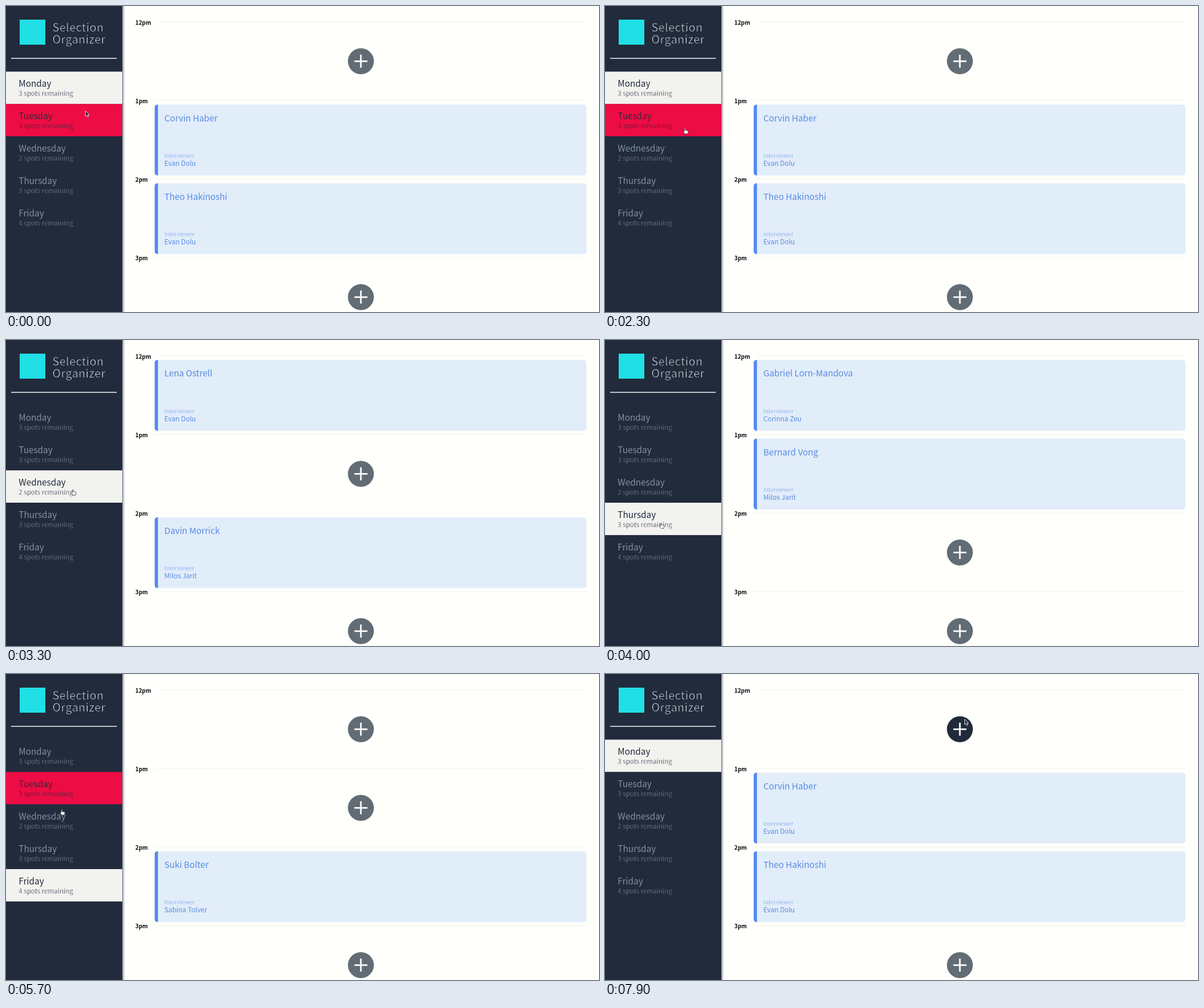
An HTML page for the animation above (8 s loop, 1041 by 538 pixels).

```html
<!DOCTYPE html>
<html lang="en">
<head>
<meta charset="utf-8">
<title>Weekly planner</title>
<style>
  html, body { margin: 0; width: 100%; height: 100%; overflow: hidden; background: #fffffb; }
  svg { display: block; --bg: #212b3c; }
  text { font-family: "Noto Sans CJK JP", "Noto Sans CJK SC", "Noto Sans CJK KR", "Noto Sans CJK", "Open Sans", sans-serif; }
  /* a background-coloured edge slims the regular weight to a light one */
  .thin { stroke: var(--bg); stroke-width: .35px; }
  .title { font-size: 19.7px; letter-spacing: .5px; fill: #e2e5e8; stroke-width: .7px; }
  .day rect { fill: var(--bg); }
  .day text { fill: #8290a5; }
  .day .name { font-size: 15.3px; }
  .day .spots { font-size: 11.55px; }
  .day.hot { --bg: #ee0c44; }
  .day.hot text { fill: #3c2438; }
  .day.on { --bg: #f2f2ef; }
  .day.on text { fill: #222a3b; }
  .hour { font-size: 10.03px; font-weight: 700; fill: #0b0d12; }
  .card { --bg: #e2edfa; }
  .card .face { fill: var(--bg); }
  .card text { fill: #578be1; }
  .guest { font-size: 15.2px; }
  .label { font-size: 9.95px; }
  .host { font-size: 11.86px; }
  .add circle { fill: #626c75; }
  .add path { stroke: #fff; stroke-width: 2.8; }
  .add.hot circle { fill: #212a3b; }
</style>
</head>
<body>
<svg width="1041" height="538" viewBox="0 0 1041 538">
  <defs>
    <linearGradient id="shade">
      <stop offset="0" stop-color="#2b3d5c" stop-opacity=".5"/>
      <stop offset="1" stop-color="#2b3d5c" stop-opacity="0"/>
    </linearGradient>
    <clipPath id="cardClip">
      <rect x="261" y="35" width="758" height="124.7" rx="5"/>
    </clipPath>
  </defs>
  <rect width="1041" height="538" fill="#fffffb"/>
  <rect x="204" width="5" height="538" fill="url(#shade)"/>
  <rect width="204.3" height="538" fill="#212b3c"/>
  <rect x="24" y="24" width="45" height="44" fill="#20dfe5"/>
  <text class="thin title" x="81.5" y="45">Selection</text>
  <text class="thin title" x="81.5" y="66">Organizer</text>
  <path d="M9 92H194.5" stroke="#f4f5f5" stroke-width="1.6"/>
  <g id="days"></g>
  <g id="slots"></g>
  <path id="arrow" d="M.5 .5V9.8L2.7 7.9L4.3 11.3L6 10.5L4.5 7.2H7.2Z"
        fill="#20222a" stroke="#f4f0f0" stroke-width=".9"/>
  <path id="hand" d="M2.6 6.6V1.5Q3.4 .1 4.2 1.5V4.5L8 5.1Q9 5.4 8.9 6.4L8.2 10.8H3.5L.7 7.3Q.6 6 1.7 6.2Z"
        fill="#fff" stroke="#333842" stroke-width=".8" stroke-linejoin="round"/>
</svg>
<script>
const LOOP = 8000, TICK = 100;
const LEAD = 150; // the page reacts this much before the drawn pointer gets there
const SIDE = 204, TOP = 115.4, ROW = 56.9, SLOT = 138.25;
const BUTTON = { x: 623, y: 97.1, r: 22.8 };
const $ = id => document.getElementById(id);

const week = [
  { name: 'Monday', spots: 3, booked: { 1: ['Corvin Haber', 'Evan Dolu'], 2: ['Theo Hakinoshi', 'Evan Dolu'] } },
  { name: 'Tuesday', spots: 3, booked: { 0: ['Tobin Varden', 'Marianna Brodic'] } },
  { name: 'Wednesday', spots: 2, booked: { 0: ['Lena Ostrell', 'Evan Dolu'], 2: ['Davin Morrick', 'Milos Jarit'] } },
  { name: 'Thursday', spots: 3, booked: { 0: ['Gabriel Lorn-Mandova', 'Corinna Zeu'], 1: ['Bernard Vong', 'Milos Jarit'] } },
  { name: 'Friday', spots: 4, booked: { 2: ['Suki Bolter', 'Sabina Tolver'] } }
];

// pointer moves; it rests in between
const home = { x: 139, y: 184 };
const moves = [
  { from: 1100, to: 1300, x: 142, y: 135 },
  { from: 1300, to: 1600, x: 139, y: 220 },
  { from: 1600, to: 2000, x: 138, y: 236 },
  { from: 2000, to: 2300, x: 137, y: 214 },
  { from: 2800, to: 3100, x: 114, y: 262 },
  { from: 3600, to: 4000, x: 95, y: 320.5 },
  { from: 4200, to: 4700, x: 80, y: 374.5 },
  { from: 5200, to: 6000, x: 103, y: 155 },
  { from: 6600, to: 7000, x: 486, y: 87 },
  { from: 7100, to: 7200, x: 640, y: 121 },
  { from: 7200, to: 7300, x: 672, y: 49 },
  { from: 7400, to: 7900, x: 631, y: 79 }
];
const clicks = [2700, 3300, 4000, 4900, 6300];

function pointer(t) {
  return moves.reduce((p, m) => {
    const k = Math.min(1, Math.max(0, (t - m.from) / (m.to - m.from)));
    return { x: p.x + (m.x - p.x) * k, y: p.y + (m.y - p.y) * k };
  }, home);
}

const rowAt = p => p.x < SIDE ? Math.floor((p.y - TOP) / ROW) : -1;
const overButton = p => Math.hypot(p.x - BUTTON.x, p.y - BUTTON.y) < BUTTON.r;

function selected(t) {
  const last = clicks.filter(c => c <= t).pop();
  return last ? rowAt(pointer(last)) : 0;
}

$('days').innerHTML = week.map((d, i) => `
  <g class="day" transform="translate(0 ${TOP + i * ROW})">
    <rect width="${SIDE}" height="${ROW}"/>
    <text class="name" x="22.3" y="26.8">${d.name}</text>
    <text class="thin spots" x="22.3" y="42.8">${d.spots} spots remaining</text>
  </g>`).join('');
const rows = [...document.querySelectorAll('.day')];

const card = ([guest, host]) => `
  <g class="card">
    <g clip-path="url(#cardClip)">
      <rect class="face" x="261" y="35" width="758" height="125"/>
      <rect x="261" y="35" width="5.8" height="125" fill="#568af2"/>
    </g>
    <text class="guest" x="278" y="64.3">${guest}</text>
    <text class="thin label" x="278" y="128.8">Interviewer</text>
    <text class="host" x="278" y="142.8">${host}</text>
  </g>`;

const add = `<g class="add" transform="translate(${BUTTON.x} ${BUTTON.y})">
  <circle r="${BUTTON.r}"/><path d="M-11.5 0H11.5M0 -11.5V11.5"/></g>`;

function showDay(day) {
  $('slots').innerHTML = [12, 1, 2, 3].map((hour, i) => {
    const slot = week[day].booked[i];
    return `<g transform="translate(0 ${i * SLOT})">
      <text class="hour" x="227" y="32.5">${hour}pm</text>
      <path d="M${i ? 261 : 267} 27.6H1019" stroke="#f1f1ee"/>
      ${slot ? card(slot) : add}</g>`;
  }).join('');
}

let shown = -1;
function draw() {
  const t = Math.floor(performance.now() % LOOP / TICK) * TICK;
  const at = pointer(t), ahead = pointer(t + LEAD);
  const day = selected(t);
  if (day !== shown) showDay(shown = day);
  rows.forEach((row, i) => {
    row.classList.toggle('on', i === day);
    row.classList.toggle('hot', i === rowAt(ahead) && i !== day);
  });
  document.querySelector('.add').classList.toggle('hot', overButton(ahead));

  // the hand appears once the pointer has come back to the list
  const pointing = t > moves[0].to && rowAt(at) >= 0;
  $('hand').style.display = pointing ? '' : 'none';
  $('arrow').style.display = pointing ? 'none' : '';
  $(pointing ? 'hand' : 'arrow').setAttribute('transform', `translate(${at.x} ${at.y})`);
  requestAnimationFrame(draw);
}
draw();
</script>
</body>
</html>
```
